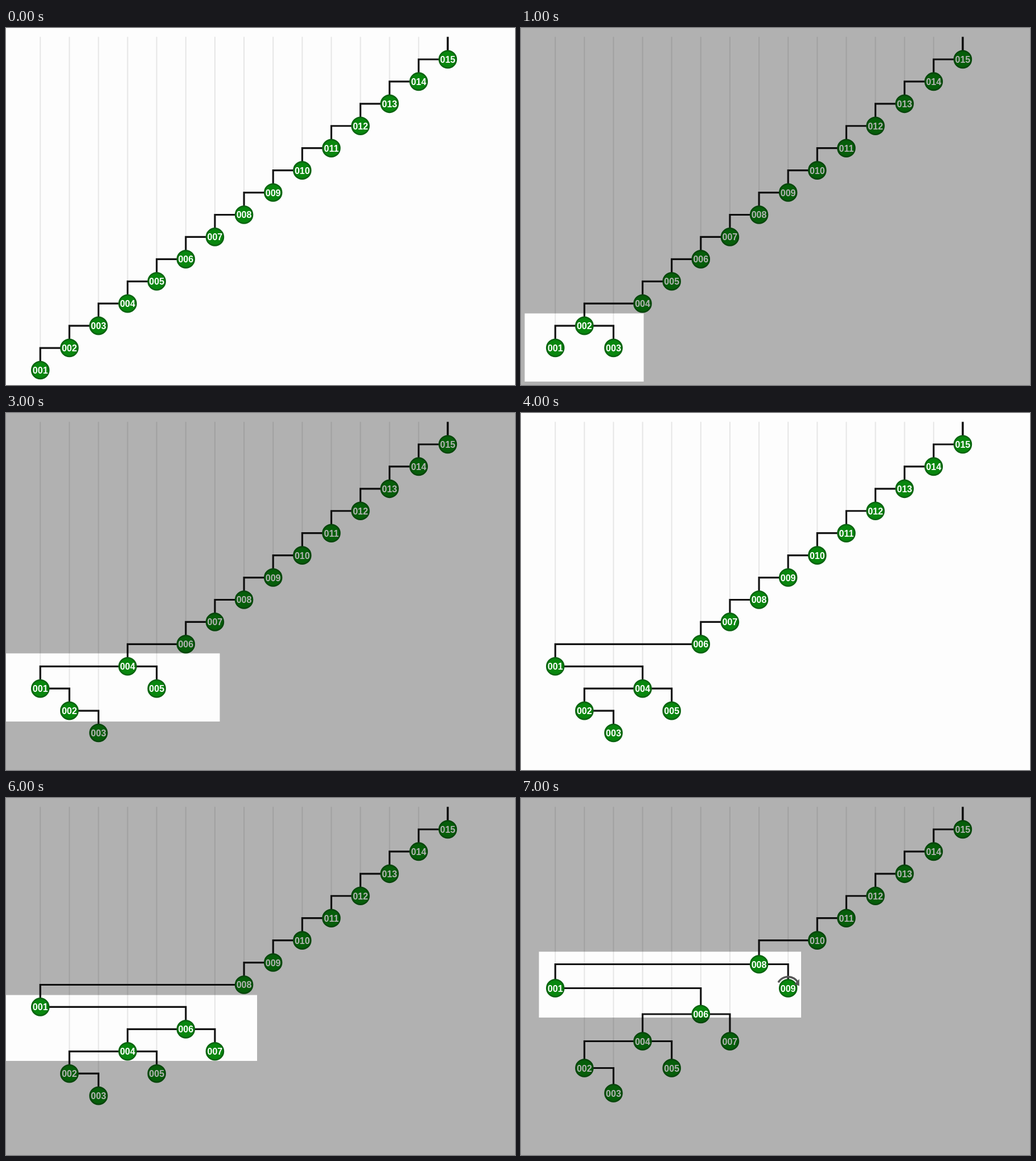
An HTML page with a canvas for the animation above (8000 ms loop, 894 by 626 pixels).

```html
<!DOCTYPE html>
<html>
<head>
<meta charset="utf-8">
<title>Tree rotations</title>
<style>
html, body { margin: 0; width: 100%; height: 100%; overflow: hidden; background: #fdfdfd; }
canvas { display: block; }
</style>
</head>
<body>
<canvas id="stage" width="894" height="626"></canvas>
<script>
const ctx = document.getElementById('stage').getContext('2d');
const COUNT = 15, TOP = 15.5, STEP = 38.93, HOLD = 1000;

// parents[i] is the parent of node i + 1; all later nodes form a plain chain.
// focus is the undimmed box; levels are row heights while rows still settle.
const low = [6.5, 500.5, 209, 119.5], middle = [0, 345.5, 441, 115.5];
const states = [
  { parents: [] },
  { parents: [2, 4, 2], focus: low },
  { parents: [4, 1, 2], focus: low },
  { parents: [4, 1, 2, 6, 4], focus: [0, 421.5, 375.5, 119.5] },
  { parents: [6, 4, 2, 1, 4] },
  { parents: [6, 4, 2, 1, 4, 8, 6], focus: middle, levels: [366.5, 406.5, 449.5, 492, 537] },
  { parents: [8, 4, 2, 6, 4, 1, 6], focus: middle },
  { parents: [8, 4, 2, 6, 4, 1, 6, 10, 8], focus: [31.5, 269.5, 460.5, 115.5],
    levels: [291.5, 333.5, 379, 426.5, 473.5, 517.5], arrow: 9 }
];

const nodeX = id => 60.2 + 51.12 * (id - 1);
const rowY = id => 600 - STEP * (id - 1);
const parentOf = (s, id) => s.parents[id - 1] || id + 1;

function nodeY(s, id) {
  const n = s.parents.length;
  if (id > n) return rowY(id);
  let depth = 0;
  for (let p = parentOf(s, id); p <= n; p = parentOf(s, p)) depth++;
  return s.levels ? s.levels[depth] : rowY(n) + STEP * depth;
}

function line(color, width, ...points) {
  ctx.strokeStyle = color;
  ctx.lineWidth = width;
  ctx.beginPath();
  points.forEach(([x, y]) => ctx.lineTo(x, y));
  ctx.stroke();
}

function drawNode(x, y, id) {
  ctx.beginPath();
  ctx.arc(x, y, 15, 0, 7);
  ctx.fillStyle = '#08870e';
  ctx.fill();
  ctx.lineWidth = 2.6;
  ctx.strokeStyle = '#0b6411';
  ctx.stroke();
  ctx.fillStyle = '#fff';
  ctx.fillText(String(id).padStart(3, '0'), x, y + 6);
}

function drawArrow(x, y) {
  ctx.strokeStyle = ctx.fillStyle = '#555';
  ctx.lineWidth = 3.5;
  ctx.beginPath();
  ctx.arc(x, y, 20, Math.PI * 1.17, Math.PI * 1.8);
  ctx.stroke();
  ctx.beginPath();
  ctx.moveTo(x + 11, y - 7);
  ctx.lineTo(x + 19.5, y - 16);
  ctx.lineTo(x + 19.5, y - 4);
  ctx.fill();
}

function draw(s) {
  const nodes = Array.from({ length: COUNT }, (_, i) => ({ id: i + 1, x: nodeX(i + 1), y: nodeY(s, i + 1) }));
  ctx.fillStyle = '#fdfdfd';
  ctx.fillRect(0, 0, 894, 626);
  for (const { x, y } of nodes) line('#e6e6e6', 2, [x, TOP], [x, y]);
  for (const { id, x, y } of nodes) {
    const parent = nodes[parentOf(s, id) - 1];
    if (parent) line('#141414', 3.2, [parent.x, parent.y], [x, parent.y], [x, y]);
    else line('#141414', 3.6, [x, TOP], [x, y]);
  }
  ctx.font = 'bold 16px "Liberation Sans", Arial, sans-serif';
  ctx.textAlign = 'center';
  for (const { id, x, y } of nodes) drawNode(x, y, id);
  if (s.arrow) drawArrow(nodes[s.arrow - 1].x, nodes[s.arrow - 1].y);
  if (s.focus) {
    ctx.beginPath();
    ctx.rect(0, 0, 894, 626);
    ctx.rect(...s.focus);
    ctx.fillStyle = 'rgba(0, 0, 0, .3)';
    ctx.fill('evenodd');
  }
}

function tick() {
  draw(states[Math.floor(performance.now() / HOLD) % states.length]);
  requestAnimationFrame(tick);
}
tick();
</script>
</body>
</html>
```
